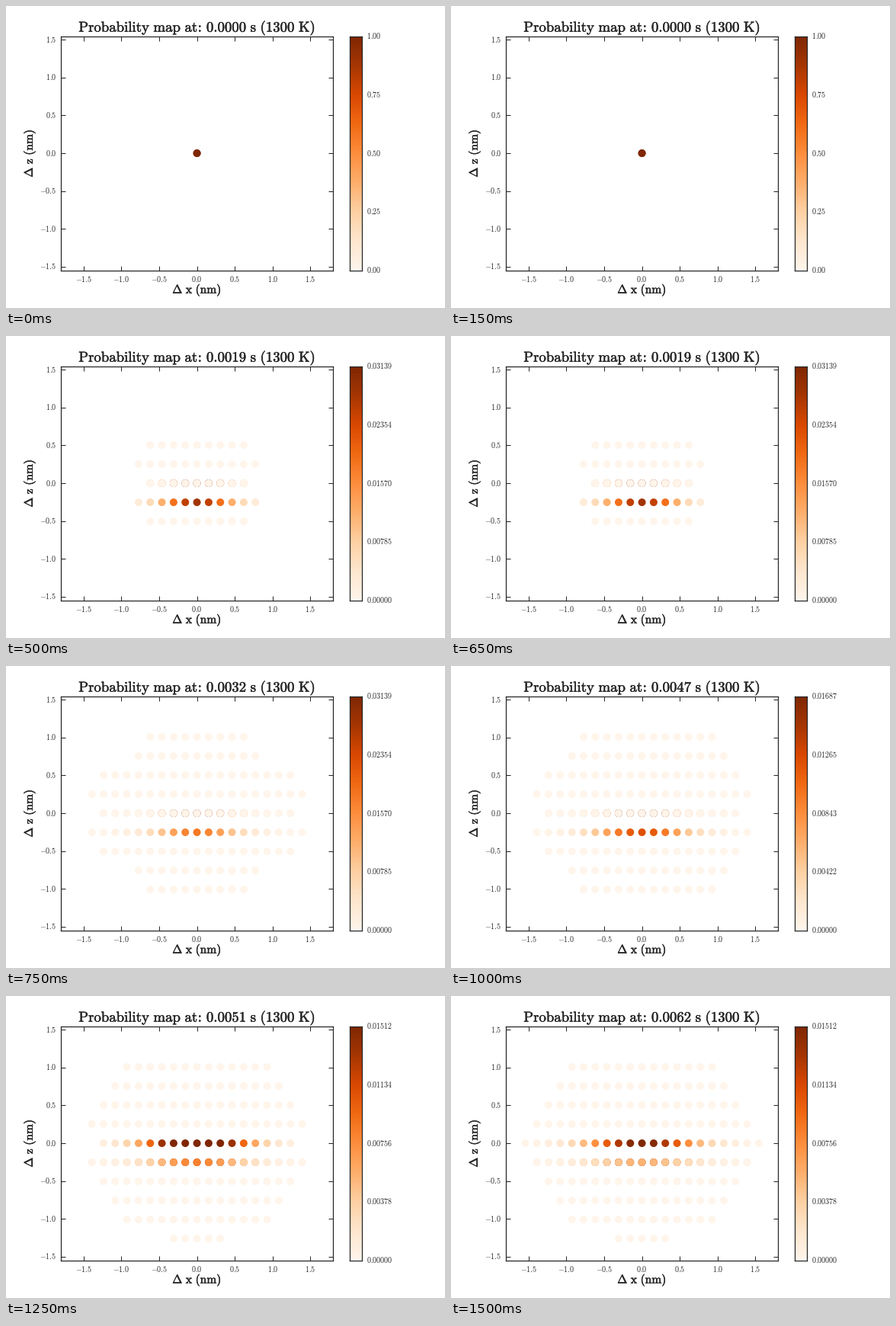
A matplotlib script that plays this animation: 576 px wide and 396 px high, repeating every 1.75 s.

```python
import numpy as np
import matplotlib.pyplot as plt
from matplotlib.animation import FuncAnimation
from matplotlib.patheffects import withStroke
from matplotlib.transforms import ScaledTranslation

plt.rcParams.update({"mathtext.fontset": "cm", "toolbar": "None"})
INK = "#262626"
DX, DZ = 0.1545, 0.252  # lattice steps in nm

TIMES = [0.0, 0.0019, 0.0019, 0.0032, 0.0047, 0.0051, 0.0062]
VMAX = [1, 0.22, 0.031392, 0.031392, 0.016866, 0.01512, 0.01512]
# relative peak of the two rows that hold nearly all the probability
PEAK = {0: [1, 1.1, 0.01, 0.01, 0.01, 1.45, 1.02],
        -1: [0, 0.37, 0.89, 0.57, 0.72, 0.54, 0.36]}
MARKS = np.linspace(0, 1, 5)


def rm(s):
    return r"$\mathrm{%s}$" % s.replace(" ", r"\ ")


def bell(k, peak, i):
    """Diffusion profile along x; it widens with each step."""
    sigma = 1.8 * max(i, 1) ** 0.34
    return np.minimum(1, peak * np.exp(-0.5 * (k / sigma) ** 2))


def columns(i, row):
    """Columns reached in a row: a diamond with blunt tips."""
    far = abs(row)
    half = min(max(4 * i - 2, 0), 10) - far
    if row == 0 and 1 < i < 6:
        half -= 2
    if far > 2:
        half -= max(0, 2 - 1.5 * (i - 3))
    if far > 4:
        half -= 3
    return np.arange(-np.floor(half), np.ceil(half) + 1)


def dots(i):
    top = min(int(2 ** (i - 1)), 4)
    bottom = -top - (i > 4)
    # the row that was hot before shows through as thin rims
    old = 0 if i < 5 else -1
    k = columns(i, old)
    layers = [(k, np.full_like(k, old), bell(k, 1.2, i))]
    for row in range(top, bottom - 1, -1):
        k = columns(i, row)
        peak = PEAK[row][i] if row in PEAK else 0
        layers.append((k, np.full_like(k, row), bell(k, peak, i)))
    return np.hstack(layers)


def raise_labels(axis, px=1.4):
    shift = ScaledTranslation(0, px / 72, fig.dpi_scale_trans)
    for label in axis.get_ticklabels():
        label.set_transform(label.get_transform() + shift)


fig = plt.figure(figsize=(8, 5.5), dpi=72, facecolor="white")
ax = fig.add_axes([0.125, 0.125, 0.62, 0.775])
ax.set_xlim(-1.8, 1.8)
ax.set_ylim(-1.547, 1.547)
ticks = np.arange(-1.5, 1.6, 0.5)
names = ["$%.1f$" % t for t in ticks]
ax.set_xticks(ticks, names)
ax.set_yticks(ticks, names)
ax.tick_params(direction="in", top=True, right=True, length=6, width=1,
               pad=6, labelsize=10, color=INK, labelcolor=INK)
ax.tick_params(axis="x", pad=5)
bold = dict(color=INK, path_effects=[withStroke(linewidth=0.5, foreground=INK)])
ax.set_xlabel(rm(r"\Delta x (nm)"), size=15.6, labelpad=-1, **bold)
ax.set_ylabel(rm(r"\Delta z (nm)"), size=15.6, labelpad=3, **bold)
title = ax.set_title("", size=18.8, pad=6, **bold)

bar = fig.add_axes([451.44 / 576, 0.125, 15.35 / 576, 0.775])
bar.imshow(np.linspace(0, 1, 256)[:, None], cmap="Oranges", origin="lower",
           aspect="auto", extent=(0, 1, 0, 1))
bar.set_xticks([])
bar.set_yticks(MARKS)
bar.yaxis.tick_right()
bar.tick_params(length=0, pad=6.5, labelsize=10, labelcolor=INK)

for a in (ax, bar):
    raise_labels(a.yaxis)
    for s in a.spines.values():
        s.set(color=INK, linewidth=1.25)

cloud = ax.scatter([], [], s=100, c=[], cmap="Oranges", vmin=0, vmax=1,
                   linewidths=0, zorder=2)


def draw(i):
    k, row, v = dots(i)
    cloud.set_offsets(np.column_stack([k * DX, row * DZ]))
    cloud.set_array(v)
    title.set_text(rm(r"Probability map at\!:\! %.4f s (1300 K)" % TIMES[i]))
    digits = 5 if i > 1 else 2 + i
    bar.set_yticklabels(["$%.*f$" % (digits, m * VMAX[i]) for m in MARKS])
    return cloud, title


anim = FuncAnimation(fig, draw, frames=len(TIMES), interval=250, repeat=True,
                     repeat_delay=0, blit=False)
plt.show()
```
